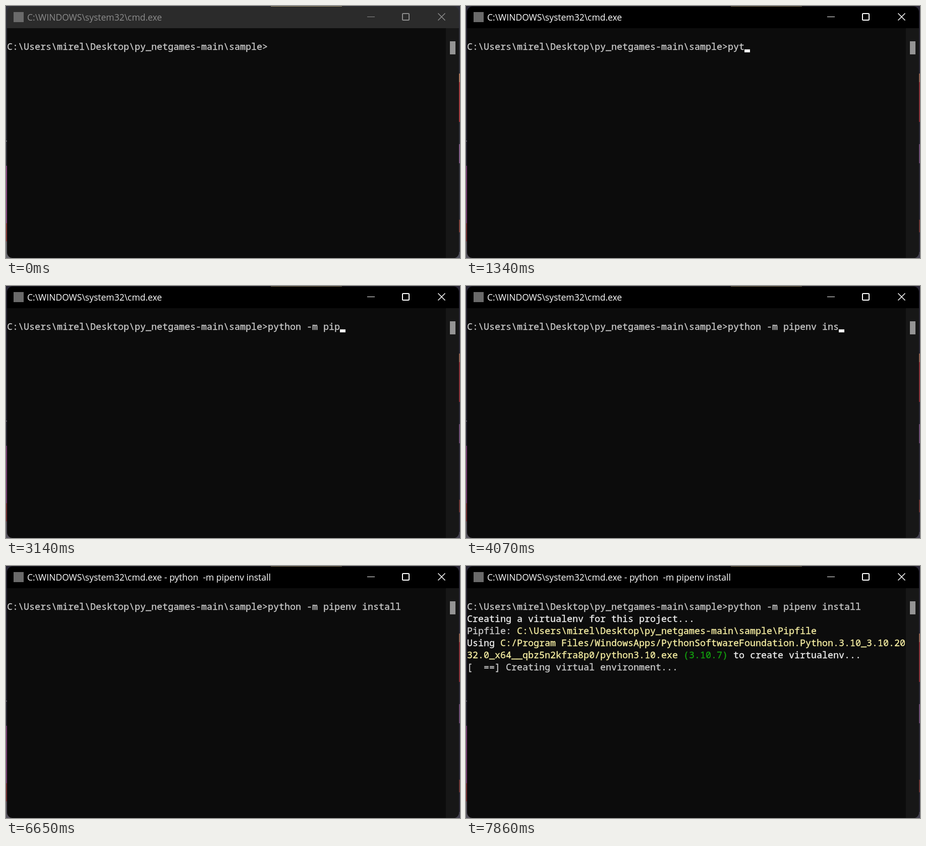
These frames come from a looping animation (900 by 500 pixels, 7.99 s). An HTML page with a canvas:

```html
<!DOCTYPE html>
<html lang="en">
<head>
<meta charset="utf-8">
<title>Terminal</title>
<style>
  html, body { margin: 0; width: 100%; height: 100%; overflow: hidden; background: #0c0c0c; }
  canvas { display: block; }
</style>
</head>
<body>
<canvas id="stage" width="900" height="500"></canvas>
<script>
const ctx = document.getElementById('stage').getContext('2d');

const LOOP = 7990;
const CELL = 11, ROW = 24, LEFT = 2, BASE = 87;
const GRAY = '#cccccc', WHITE = '#f2f2f2', YELLOW = '#f9f1a5', GREEN = '#13a10e';
const MONO = '18.333px "Noto Sans Mono", "DejaVu Sans Mono", monospace';
const SANS = '17.5px "Open Sans", "Noto Sans", sans-serif';

const FOLDER = 'C:\\Users\\mirel\\Desktop\\py_netgames-main\\sample';
const PROMPT = FOLDER + '>';
const COMMAND = 'python -m pipenv install';
const EXE_HEAD = 'C:/Program Files/WindowsApps/PythonSoftwareFoundation.Python.3.10_3.10.20';
const EXE_TAIL = '32.0_x64__qbz5n2kfra8p0/python3.10.exe';

// Typing pace: [time, characters typed], steady in between
const PACE = [[860, 1], [1140, 2], [1660, 6], [2010, 8], [2810, 11], [3400, 15], [4070, 20], [4610, 24]];

function typedAt(t) {
  const next = PACE.findIndex(([time]) => t < time);
  if (next === 0) return 0;
  if (next < 0) return COMMAND.length;
  const [t0, n0] = PACE[next - 1], [t1, n1] = PACE[next];
  return Math.floor(n0 + (n1 - n0) * (t - t0) / (t1 - t0) + 1e-6);
}

// A three-cell block sliding through a four-cell slot and back
function spinnerAt(t) {
  const step = Math.floor((t - 7120) / 82) % 14;
  const shift = 7 - Math.abs(7 - step);
  return '    ===    '.slice(7 - shift, 11 - shift);
}

function rect(x, y, w, h, color) {
  ctx.fillStyle = color;
  ctx.fillRect(x, y, w, h);
}

// Writes on the character grid and returns the next free column.
function write(row, col, text, color) {
  ctx.font = MONO;
  ctx.fillStyle = ctx.strokeStyle = color;
  ctx.lineWidth = 0.35;
  for (const ch of text) {
    const x = LEFT + col * CELL, y = BASE + row * ROW;
    ctx.fillText(ch, x, y);
    ctx.strokeText(ch, x, y);
    col++;
  }
  return col;
}

function cursor(row, col) {
  rect(LEFT + col * CELL, 86 + row * ROW, CELL, 6, WHITE);
}

function drawDesktop(active) {
  const left = (y, h, color) => rect(0, y, 2, h, color);
  const right = (y, h, color) => rect(898, y, 2, h, color);
  rect(0, 0, 900, 500, '#30303a');
  rect(525, 0, 141, 1, '#a89a78');
  left(267, 2, '#70707a');
  left(317, 114, '#8e4a86');
  left(431, 36, '#8c3c3c');
  rect(0, 467, 12, 33, '#68686e');
  right(134, 17, '#b07a60');
  right(151, 79, '#a83c40');
  right(274, 38, '#86608c');
  right(424, 25, '#84443e');
  rect(888, 488, 12, 12, '#50505c');
  if (active) rect(0, 0, 900, 500, 'rgba(20, 0, 30, 0.18)');
}

function drawButtons(color) {
  rect(716, 21, 15, 1, color);
  ctx.strokeStyle = color;
  ctx.lineWidth = 2;
  ctx.beginPath();
  ctx.roundRect(786, 15, 13, 13, 1.5);
  ctx.stroke();
  ctx.lineWidth = 1.5;
  ctx.beginPath();
  ctx.moveTo(856.5, 14.5);
  ctx.lineTo(870.5, 28.5);
  ctx.moveTo(870.5, 14.5);
  ctx.lineTo(856.5, 28.5);
  ctx.stroke();
}

function drawWindow(t) {
  const active = t >= 330;
  const ink = active ? '#ffffff' : '#8c8c8c';
  drawDesktop(active);

  ctx.save();
  ctx.beginPath();
  ctx.roundRect(2, 1, 896, 499, 11);
  ctx.clip();
  rect(0, 0, 900, 44, active ? '#000000' : '#2b2b2b');
  rect(0, 44, 900, 456, '#0c0c0c');
  rect(872, 44, 28, 456, '#171717');
  rect(880, 70, 11, 26, '#949494');
  ctx.restore();

  rect(15, 12, 20, 20, '#6a6a6a');
  ctx.font = SANS;
  ctx.fillStyle = ink;
  const suffix = t >= 5600 ? ' - python  -m pipenv install' : '';
  ctx.fillText('C:\\WINDOWS\\system32\\cmd.exe' + suffix, 42, 29);
  drawButtons(ink);
}

function drawCommand(t) {
  const col = write(0, 0, PROMPT, GRAY);
  const end = write(0, col, COMMAND.slice(0, typedAt(t)), GRAY);
  if (t >= 1140 && t < 5070) cursor(0, end);
}

function drawOutput(t) {
  if (t >= 6110 && t < 6650) cursor(1, 0);
  if (t < 6850) return;
  write(1, 0, 'Creating a virtualenv for this project...', WHITE);
  write(2, write(2, 0, 'Pipfile: ', GRAY), FOLDER + '\\Pipfile', YELLOW);

  if (t < 6990) return;
  let col = write(3, 0, 'Using ', WHITE);

  if (t < 7060) return;
  write(3, col, EXE_HEAD, YELLOW);
  col = write(4, 0, EXE_TAIL, YELLOW);
  col = write(4, col, ' (3.10.7)', GREEN);
  write(4, col, ' to create virtualenv...', WHITE);

  if (t >= 7120) write(5, 0, `[${spinnerAt(t)}] Creating virtual environment...`, GRAY);
}

const start = performance.now();

function frame() {
  const t = (performance.now() - start) % LOOP;
  drawWindow(t);
  drawCommand(t);
  drawOutput(t);
  requestAnimationFrame(frame);
}
frame();
</script>
</body>
</html>
```
